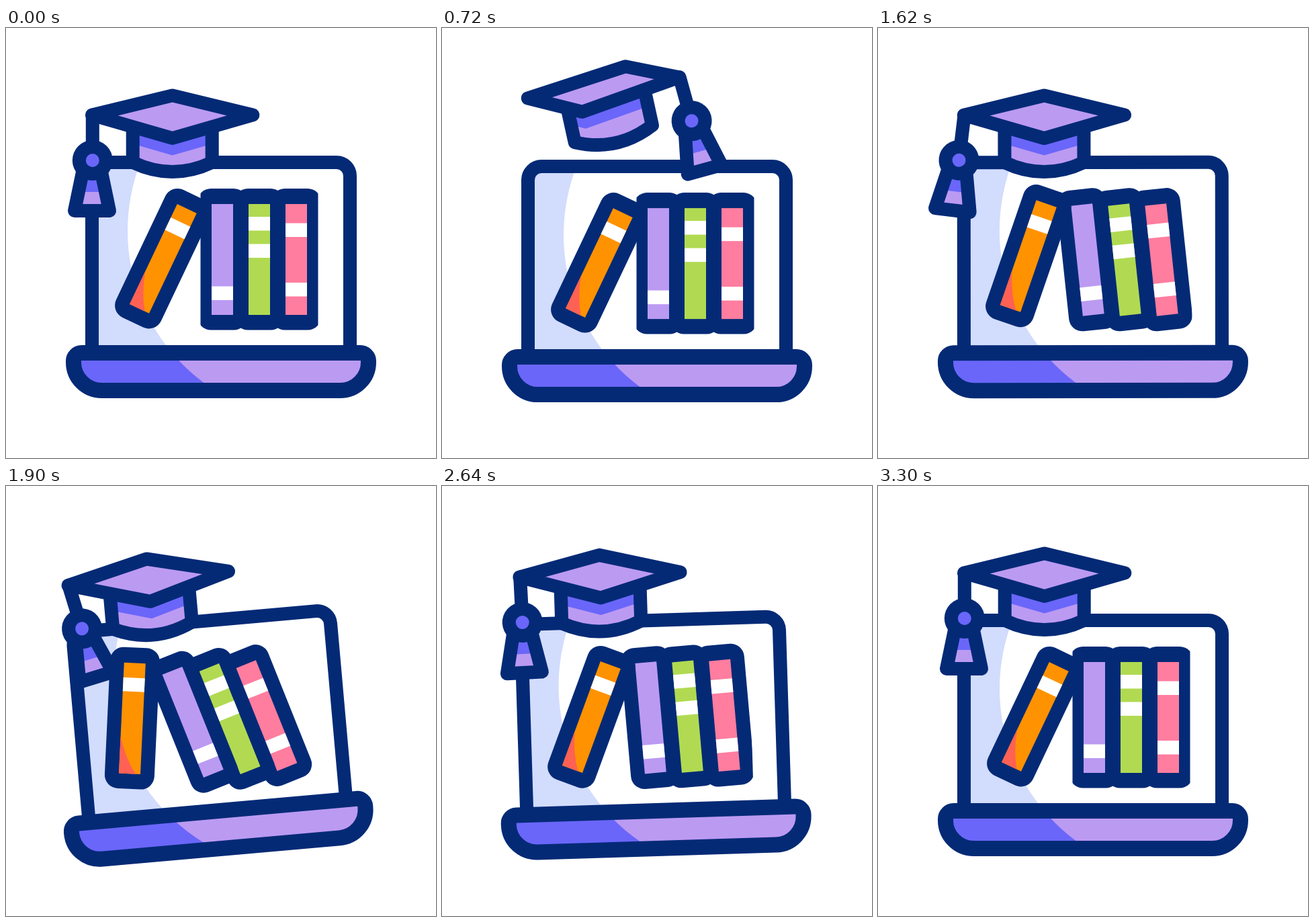
These frames come from a looping animation (640x640 px, 3.6 s). An HTML page with a canvas:

```html
<!DOCTYPE html>
<html lang="en">
<head>
<meta charset="utf-8">
<title>Online study</title>
<style>
  html, body { margin: 0; width: 100%; height: 100%; overflow: hidden; background: #fff; }
  canvas { display: block; width: 640px; height: 640px; }
</style>
</head>
<body>
<canvas id="stage" width="640" height="640"></canvas>
<script>
const ctx = document.getElementById('stage').getContext('2d');
const LOOP = 3600, STEP = 20, RAD = Math.PI / 180;
const NAVY = '#042a76', LILAC = '#bb9af2', BLUE = '#6a66f9', PALE = '#d2dcfd',
      ORANGE = '#ff9200', RED = '#ff6154', GREEN = '#b1da52', PINK = '#ff7d9f', WHITE = '#fff';

// Keyframes as [time, value] pairs, eased in and out.
const motion = {
  drop:   [[0, 0], [435, 54.5], [795, 0]],
  lift:   [[0, 0], [800, -42], [1600, 0]],
  spin:   [[0, 0], [850, 1], [1600, 0]],
  tassel: [[0, 0], [400, 15], [800, -19], [1200, -22], [1600, 7],
           [2000, -15.5], [2400, 25], [2800, -15.5], [3200, 0]],
  rock:   [[1600, 0], [2000, -6], [2400, 6], [2800, -6], [3200, 0]],
  lean:   [[1400, 0], [1950, -17.2], [2100, -17.6], [2700, -2.9], [3300, 0]]
};

function valueAt(keys, t) {
  if (t <= keys[0][0]) return keys[0][1];
  for (let i = 1; i < keys.length; i++) {
    const [t0, a] = keys[i - 1], [t1, b] = keys[i];
    if (t < t1) {
      const u = (t - t0) / (t1 - t0);
      return a + (b - a) * u * u * (3 - 2 * u);
    }
  }
  return keys[keys.length - 1][1];
}

function group(x, y, degrees, draw) {
  ctx.save();
  ctx.translate(x, y);
  ctx.rotate(degrees * RAD);
  draw();
  ctx.restore();
}

function clipped(path, draw) {
  ctx.save();
  ctx.clip(path);
  draw();
  ctx.restore();
}

function rect(color, x, y, w, h) {
  ctx.fillStyle = color;
  ctx.fillRect(x, y, w, h);
}

function disc(color, x, y, r) {
  ctx.fillStyle = color;
  ctx.beginPath();
  ctx.arc(x, y, r, 0, 2 * Math.PI);
  ctx.fill();
}

function fill(path, color) {
  ctx.fillStyle = color;
  ctx.fill(path);
}

function outline(path, width = 20) {
  ctx.lineWidth = width;
  ctx.strokeStyle = NAVY;
  ctx.stroke(path);
}

function polygon(points) {
  const path = new Path2D();
  points.forEach(([x, y]) => path.lineTo(x, y));
  path.closePath();
  return path;
}

const screen = new Path2D('M128 484V220A20 20 0 0 1 148 200H492A20 20 0 0 1 512 220V484');
const base = new Path2D('M112.5 483.5H527.5A12 12 0 0 1 539.5 495.5V497.5' +
  'A42 42 0 0 1 497.5 539.5H142.5A42 42 0 0 1 100.5 497.5V495.5A12 12 0 0 1 112.5 483.5Z');
const capBody = new Path2D('M-59 12V70.5Q0 98.5 59 70.5V12Z');
const tail = polygon([[-14, 85], [14, 85], [26, 142.5], [-26, 142.5]]);
const redCorner = new Path2D('M-16 -54Q-7 -22 9 0H-16Z');

function shaded(path, dark, light) {
  clipped(path, () => {
    rect(dark, 90, 190, 460, 360);
    disc(light, 463, 302, 282);
  });
}

function drawLaptop() {
  shaded(screen, PALE, WHITE);
  outline(screen);
}

function drawBase() {
  shaded(base, BLUE, LILAC);
  outline(base, 23);
}

// The pivot lies `foot` below the coloured spine.
function drawBook(x, y, degrees, foot, color, bands, extra) {
  group(x, y, degrees, () => {
    ctx.translate(0, -foot);
    ctx.fillStyle = NAVY;
    ctx.beginPath();
    ctx.roundRect(-37, -188, 74, 210.5, 20);
    ctx.fill();
    rect(color, -16, -165, 32, 165);
    if (extra) extra();
    bands.forEach(top => rect(WHITE, -16, top - 165, 32, 20.5));
  });
}

function drawBooks(lean) {
  const slack = Math.abs(lean);
  const shelf = new Path2D();
  const left = 289.5 - 12 * slack, right = 464.5 + 0.5 * slack;
  shelf.rect(left, 200, right - left, 300);
  clipped(shelf, () => {
    drawBook(432, 438, lean, 11, PINK, [28.5, 117]);
    drawBook(377, 438, lean, 11, GREEN, [19, 59.5]);
    drawBook(322, 438, lean, 11, LILAC, [122.5]);
  });
  drawBook(192.5, 430.6, 25.4 + 1.05 * lean, 14, ORANGE, [22], () => fill(redCorner, RED));
}

function drawCap(lift, spin, swing) {
  const corner = degrees => {
    const c = Math.cos(degrees * RAD), s = Math.sin(degrees * RAD);
    return [119.7 * c, (31.8 - 4.5 * spin) * s + 2.7 * s * s];
  };
  const first = 180 - 172 * spin, tilt = -13.2 * spin;
  const corners = [0, 90, 180, 270].map(a => corner(first + a));
  const board = polygon(corners);

  group(247.7 - 8 * spin, 129.5 + lift, 0, () => {
    group(0, 0, tilt, () => {
      fill(capBody, LILAC);
      clipped(capBody, () => {
        ctx.translate(0, 25.5);
        fill(board, BLUE);
      });
      outline(capBody);
      fill(board, LILAC);
      outline(board);
    });

    const [x, y] = corners[0];
    const c = Math.cos(tilt * RAD), s = Math.sin(tilt * RAD);
    group(x * c - y * s, x * s + y * c, swing, drawTassel);
  });
}

function drawTassel() {
  fill(tail, LILAC);
  clipped(tail, () => rect(BLUE, -30, 80, 60, 34.5));
  outline(tail);
  outline(new Path2D('M0.8 0V68'));
  disc(NAVY, 0.8, 67.5, 30);
  disc(BLUE, 0.8, 67.5, 10);
}

function draw(t) {
  const now = {};
  for (const name in motion) now[name] = valueAt(motion[name], t);
  rect(WHITE, 0, 0, 640, 640);
  ctx.lineJoin = ctx.lineCap = 'round';
  group(320, 540, now.rock, () => {
    ctx.translate(-320, -540);
    group(0, now.drop, 0, () => {
      drawLaptop();
      drawBooks(now.lean);
      drawBase();
    });
    drawCap(now.lift, now.spin, now.tassel);
  });
}

let start = null;
function frame(time) {
  if (start === null) start = time;
  const t = Math.max(0, time - start) % LOOP;
  draw(Math.floor(t / STEP) * STEP);
  requestAnimationFrame(frame);
}
draw(0);
requestAnimationFrame(frame);
</script>
</body>
</html>
```
